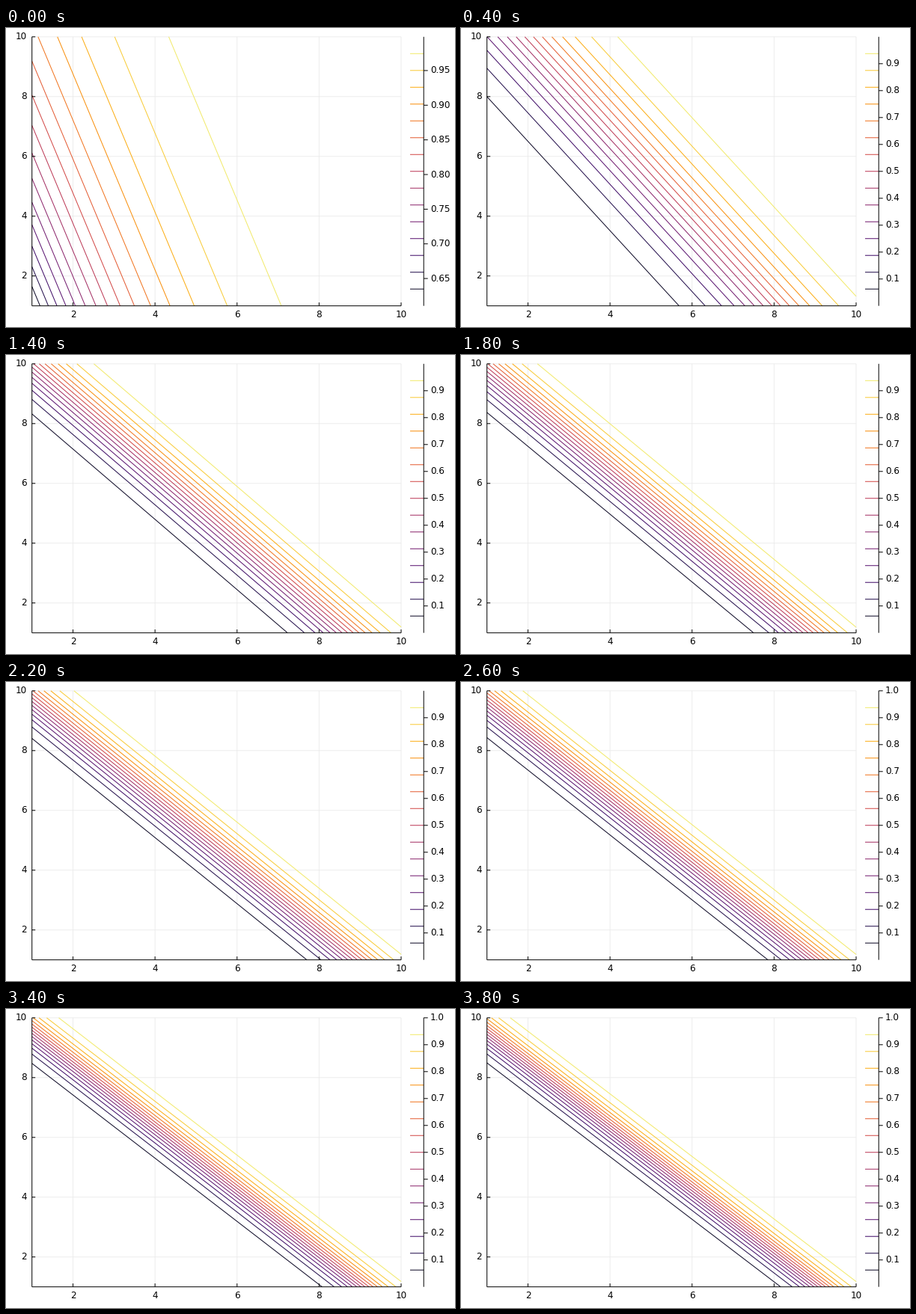
Animation of 600x400 px, one loop 4 s. Source, as a matplotlib script:

```python
import numpy as np
import matplotlib.pyplot as plt
from matplotlib.animation import FuncAnimation

W, H, DPI = 600, 400, 100
FRAMES, INTERVAL = 20, 200
LEFT, RIGHT, TOP, BOTTOM = 34.7, 528, 11.8, 371.7
BAR_X0, BAR_X1 = 540, 558.2
LEVELS = 15
PX = 72 / DPI  # one pixel in points

plt.rcParams["font.family"] = "DejaVu Sans"
fig = plt.figure(figsize=(W / DPI, H / DPI), dpi=DPI, facecolor="white")
ax = fig.add_axes([0, 0, 1, 1])
ax.set_xlim(0, W)
ax.set_ylim(H, 0)
ax.axis("off")


def px(x):
    return LEFT + (x - 1) / 9 * (RIGHT - LEFT)


def py(y):
    return BOTTOM - (y - 1) / 9 * (BOTTOM - TOP)


def line(xs, ys, color="black", width=1.0, zorder=4):
    return ax.plot(xs, ys, color=color, lw=width * PX, zorder=zorder,
                   solid_capstyle="butt", snap=False)[0]


def label(x, y, text, ha):
    return ax.text(x, y, text, ha=ha, va="center", fontsize=12 * PX)


def logit(p):
    return np.log(p / (1 - p))


def sigmoid(s):
    return 1 / (1 + np.exp(-s))


# Training step, lowest and highest contour's x at y = 1, steepness
STEP, LOW, HIGH, STEEP = np.array([
    (1, 4.604, 10.258, 1.839),
    (2, 5.680, 10.214, 1.494),
    (5, 6.870, 10.160, 1.237),
    (7, 7.230, 10.166, 1.1755),
    (11, 7.700, 10.166, 1.1055),
    (15, 7.970, 10.168, 1.0695),
    (19, 8.160, 10.169, 1.0465),
]).T
EDGE = logit(LEVELS / (LEVELS + 1))
W1 = 2 * EDGE / (HIGH - LOW)
W2 = W1 / STEEP
BIAS = EDGE + W1 * LOW + W2


def weights(step):
    """Classifier weights: the bias grows as a power of the step."""
    if step == 0:
        return 0.5246, 0.160, -0.235
    bias = np.exp(np.interp(np.log(step), np.log(STEP), np.log(BIAS)))
    return np.interp(bias, BIAS, W1), np.interp(bias, BIAS, W2), -bias


# Grid, axes and ticks
for v in (2, 4, 6, 8, 10):
    line([px(v)] * 2, [TOP, BOTTOM], "#ebebeb", 0.9, zorder=1)
    line([LEFT, RIGHT], [py(v)] * 2, "#ebebeb", 0.9, zorder=1)
    line([px(v)] * 2, [BOTTOM, BOTTOM - 4.5])
    line([LEFT, LEFT + 4.5], [py(v)] * 2)
    label(px(v), 383.5, str(v), "center")
    label(28, py(v), str(v), "right")
line([LEFT, LEFT], [TOP, BOTTOM])
line([LEFT, RIGHT], [BOTTOM, BOTTOM])

# Contours and colour bar
shares = np.arange(1, LEVELS + 1) / (LEVELS + 1)
contours = []
for s in shares:
    color = plt.cm.inferno(s)
    contours.append(line([], [], color, zorder=3))
    line([BAR_X0, BAR_X1], [BOTTOM - s * (BOTTOM - TOP)] * 2, color, zorder=3)
line([BAR_X1, BAR_X1], [TOP, BOTTOM])
ticks = [(line([], []), label(567, 0, "", "left")) for _ in range(10)]


def bar_values(step):
    if step == 0:
        return [f"{v:.2f}" for v in np.arange(0.65, 0.96, 0.05)]
    count = 10 if step >= 12 else 9
    return [f"{v / 10:.1f}" for v in range(1, count + 1)]


def update(step):
    w1, w2, b = weights(step)
    lo = sigmoid(w1 + w2 + b)
    hi = sigmoid(10 * (w1 + w2) + b)

    for contour, s in zip(contours, logit(lo + shares * (hi - lo))):
        # Keep only the part with x and y between 1 and 10
        ys = np.clip((s - b - w1 * np.array([10, 1])) / w2, 1, 10)
        contour.set_data(px((s - b - w2 * ys) / w1), py(ys))

    names = bar_values(step)
    for i, (tick, text) in enumerate(ticks):
        shown = i < len(names)
        tick.set_visible(shown)
        text.set_visible(shown)
        if shown:
            y = BOTTOM - (float(names[i]) - lo) / (hi - lo) * (BOTTOM - TOP)
            tick.set_data([BAR_X1, BAR_X1 + 5.5], [y, y])
            text.set_text(names[i])
            text.set_y(y)
    return contours


anim = FuncAnimation(fig, update, frames=FRAMES, interval=INTERVAL,
                     repeat=True, repeat_delay=0, blit=False)
plt.show()
```
